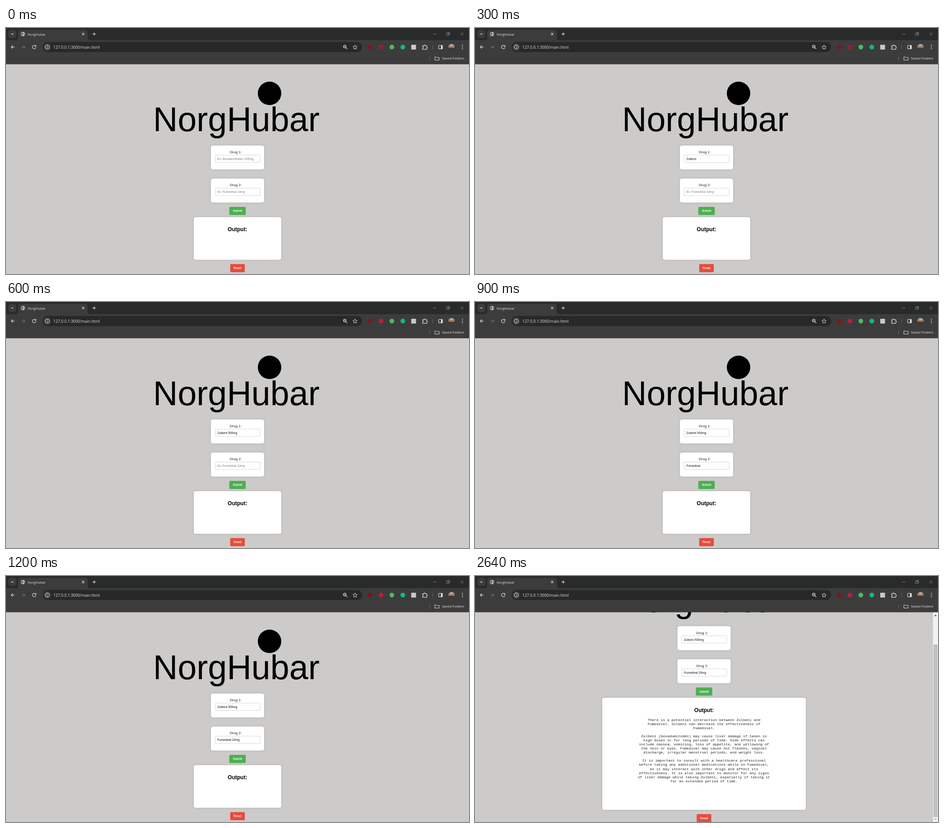
These frames come from a looping animation (1026x546 px, 3400 ms). An HTML page:

```html
<!DOCTYPE html>
<html lang="en">
<head>
<meta charset="utf-8">
<title>NorgHubar</title>
<style>
  html, body { margin: 0; width: 100%; height: 100%; overflow: hidden; background: #cccbc9; }
  svg { display: block; }
  text { font-family: "Liberation Sans", Arial, sans-serif; }
  .ui text { font-family: "Open Sans", "Noto Sans", sans-serif; fill: #e3e3e3; }
  .mid { text-anchor: middle; }
  .card { fill: #fff; filter: drop-shadow(0 0 2px rgba(0, 0, 0, .16)); }
  .field { fill: #fff; stroke: #ccc; stroke-width: .8; }
  .small { font-size: 6.67px; }
  .label { font-size: 8px; fill: #222; }
  .button { fill: #fff; stroke: #fff; stroke-width: .15; }
  .icon { fill: none; stroke: #dedede; stroke-width: 1.2; }
  .dim { stroke: #858585; stroke-width: 1; }
  #report text { font: 8px "Liberation Mono", "Courier New", monospace; fill: #222; }
</style>
</head>
<body>
<svg width="1026" height="546" viewBox="0 0 1026 546">
  <rect width="1026" height="546" fill="#cccbc9"/>

  <g id="page">
    <circle cx="584" cy="145" r="26"/>
    <text x="326" y="229.3" font-size="75.4">NorgHubar</text>

    <g id="drug1">
      <rect class="card" x="454" y="260.7" width="118" height="53.4" rx="4.5"/>
      <text class="label mid" x="509" y="278">Drug 1:</text>
      <rect class="field" x="463.7" y="282" width="99.6" height="16.4" rx="1.5"/>
      <text class="small entry" x="468.5" y="293"></text>
    </g>
    <g id="drug2" transform="translate(0 73.4)">
      <rect class="card" x="454" y="260.7" width="118" height="53.4" rx="4.5"/>
      <text class="label mid" x="509" y="278">Drug 2:</text>
      <rect class="field" x="463.7" y="282" width="99.6" height="16.4" rx="1.5"/>
      <text class="small entry" x="468.5" y="293"></text>
    </g>

    <rect x="494.8" y="397" width="36.4" height="17.9" rx="2" fill="#4caf50"/>
    <text class="small button mid" x="513" y="408.2">Submit</text>

    <rect id="output" class="card" y="419.7" rx="4.5"/>
    <text class="mid" x="513" y="451" font-size="12" font-weight="bold">Output:</text>
    <g id="report" class="mid"></g>

    <g id="reset">
      <rect x="496.8" y="524" width="32.4" height="17.9" rx="2" fill="#e74c3c"/>
      <text class="small button mid" x="513" y="535">Reset</text>
    </g>
  </g>

  <g id="scrollbar">
    <rect x="1015" y="80" width="11" height="466" fill="#f3f0f0"/>
    <rect x="1016" y="152" width="9" height="383" fill="#c1c0bf"/>
    <path d="M1017.7 89l2.8-3.2 2.8 3.2z" fill="#505050"/>
    <path d="M1018 538.5l2.5 3 2.5-3z" fill="#a3a3a3"/>
  </g>

  <g class="ui">
    <rect width="1026" height="28" fill="#292a2a"/>
    <rect y="27" width="1026" height="53.5" fill="#3c3c3c"/>
    <path d="M21 27q6 0 6-6V10q0-6 6-6h142q6 0 6 6v11q0 6 6 6v1H21z" fill="#3c3c3c"/>
    <rect x="5" y="4" width="18" height="18.5" rx="6" fill="#3c3c3c"/>
    <rect x="81" y="31" width="708" height="22.5" rx="11.2" fill="#282828"/>
    <circle cx="91.5" cy="42.3" r="8.7" fill="#3a3a3a"/>

    <circle cx="37.5" cy="13.5" r="4.8" fill="#c2c6c9"/>
    <path d="M34 11.5l3-1.5 1.5 2-2 2 1 2.5-1.5.5-2.5-3zM39.5 13l2.2-.5-.7 3-1.8.5z" fill="#55585b"/>
    <text x="48" y="16.5" font-size="7.6">NorgHubar</text>
    <text x="105" y="45.6" font-size="8.65">127.0.0.1:3000/main.html</text>
    <text x="966" y="70.2" font-size="7.7">Saved Folders</text>

    <g class="icon">
      <path d="M11.7 12.2l2.3 2.3 2.3-2.3M168.6 11l4.8 4.8m0-4.8l-4.8 4.8M191.8 13.4h7.4m-3.7-3.7v7.4"/>
      <path d="M19 42.3h-7.4m3.6-3.6l-3.6 3.6 3.6 3.6M65.6 39.8a3.9 3.9 0 1 0 .8 3.4M66.4 38v3h-3"/>
      <path class="dim" d="M34.6 42.3H42m-3.6-3.6l3.6 3.6-3.6 3.6"/>
      <circle cx="91.5" cy="42.3" r="4.5"/>
      <path d="M91.5 41.7v3.1m0-5v1"/>
      <circle cx="750.7" cy="41.2" r="3"/>
      <path d="M752.9 43.5l3.4 3.4M749.2 41.2h3"/>
      <path d="M773.5 37.7l1.4 3.2 3.4.3-2.6 2.3.8 3.4-3-1.8-3 1.8.8-3.4-2.6-2.3 3.4-.3z" stroke-width="1"/>
      <path d="M923.2 39.3h3q0-2 1.5-2t1.5 2h3v2.8q1.8 0 1.8 1.5t-1.8 1.5v2.2h-9v-2.6q1.8 0 1.8-1.5t-1.8-1.5z"/>
      <rect x="958.8" y="38.5" width="8.4" height="7.8" rx="1"/>
      <path d="M965.4 38.5v7.8" stroke-width="3"/>
      <path d="M950.3 64.2h3.3l1.2 1.2h5.2v5.8h-9.7z" stroke-width="1"/>
      <path d="M945.5 37.5v10M938.5 62.5v10" stroke="#656565" stroke-width="1"/>
      <path class="dim" d="M946.5 13.5h7M976.5 11.5h5v5h-5zM978 11.5V10h5v5h-1.5M1007.3 10.2l6.4 6.4m0-6.4l-6.4 6.4"/>
    </g>
    <path d="M1010.5 37.5h1.8v1.8h-1.8zm0 3.9h1.8v1.8h-1.8zm0 3.9h1.8v1.8h-1.8z" fill="#dedede"/>

    <circle cx="807" cy="42.3" r="4.8" fill="#84101c"/>
    <circle id="badge" cx="831" cy="42.3" r="5.2"/>
    <circle cx="855" cy="42.3" r="5.2" fill="#4fb866"/>
    <circle cx="879.3" cy="42.3" r="5.2" fill="#12b886"/>
    <rect x="898" y="37.2" width="10.6" height="10.6" fill="#c9c9c9"/>

    <clipPath id="round"><circle cx="987.3" cy="42.3" r="6.8"/></clipPath>
    <g clip-path="url(#round)">
      <rect x="980" y="35" width="15" height="7" fill="#9aafc6"/>
      <rect x="980" y="41.5" width="15" height="8" fill="#4a342b"/>
      <path d="M980 42l4-3 3 2 4-2 4 3v2h-15z" fill="#a9754c"/>
    </g>
  </g>
</svg>

<script>
const LOOP = 3400;
const PLACEHOLDERS = ["Ex: Bovadumitoden 325mg", "Ex: Fumedival 10mg"];
// start time, first entry, second entry, results shown
const STEPS = [
  [0, "", "", false],
  [300, "Zulbeni", "", false],
  [600, "Zulbeni 500mg", "", false],
  [900, "Zulbeni 500mg", "Fumedival", false],
  [1200, "Zulbeni 500mg", "Fumedival 20mg", false],
  [1500, "Zulbeni 500mg", "Fumedival 20mg", true],
];
const REPORT = `There is a potential interaction between Zulbeni and
Fumedival. Zulbeni can decrease the effectiveness of
Fumedival.

Zulbeni (bovadumitoden) may cause liver damage if taken in
high doses or for long periods of time. Side effects can
include nausea, vomiting, loss of appetite, and yellowing of
the skin or eyes. Fumedival may cause hot flashes, vaginal
discharge, irregular menstrual periods, and weight loss.

It is important to consult with a healthcare professional
before taking any additional medications while on Fumedival,
as it may interact with other drugs and affect its
effectiveness. It is also important to monitor for any signs
of liver damage while taking Zulbeni, especially if taking it
for an extended period of time.`;

const $ = selector => document.querySelector(selector);
const setAttrs = (selector, attrs) => {
  for (const name in attrs) $(selector).setAttribute(name, attrs[name]);
};

$("#report").innerHTML = REPORT.split("\n")
  .map((line, i) => `<text x="513" y="${471 + i * 9.08}">${line}</text>`).join("");

function setEntry(index, value) {
  const entry = $(`#drug${index + 1} .entry`);
  entry.textContent = value || PLACEHOLDERS[index];
  entry.setAttribute("fill", value ? "#111" : "#808080");
}

function showStep([start, first, second, done]) {
  setEntry(0, first);
  setEntry(1, second);
  const width = done ? 451 : 194;
  setAttrs("#output", { x: 513 - width / 2, width, height: done ? 248.8 : 94.8 });
  setAttrs("#page", { transform: done ? "translate(-5.5 -149.4)" : "" });
  setAttrs("#reset", { transform: done ? "translate(0 154)" : "" });
  setAttrs("#report", { visibility: done ? "visible" : "hidden" });
  setAttrs("#scrollbar", { visibility: done ? "visible" : "hidden" });
  setAttrs("#badge", { fill: start < 600 ? "#9c1a38" : "#bd1c3f" });
}

let current;
function tick() {
  const time = performance.now() % LOOP;
  const step = STEPS.findLast(([start]) => start <= time);
  if (step !== current) showStep(current = step);
  requestAnimationFrame(tick);
}
tick();
</script>
</body>
</html>
```
